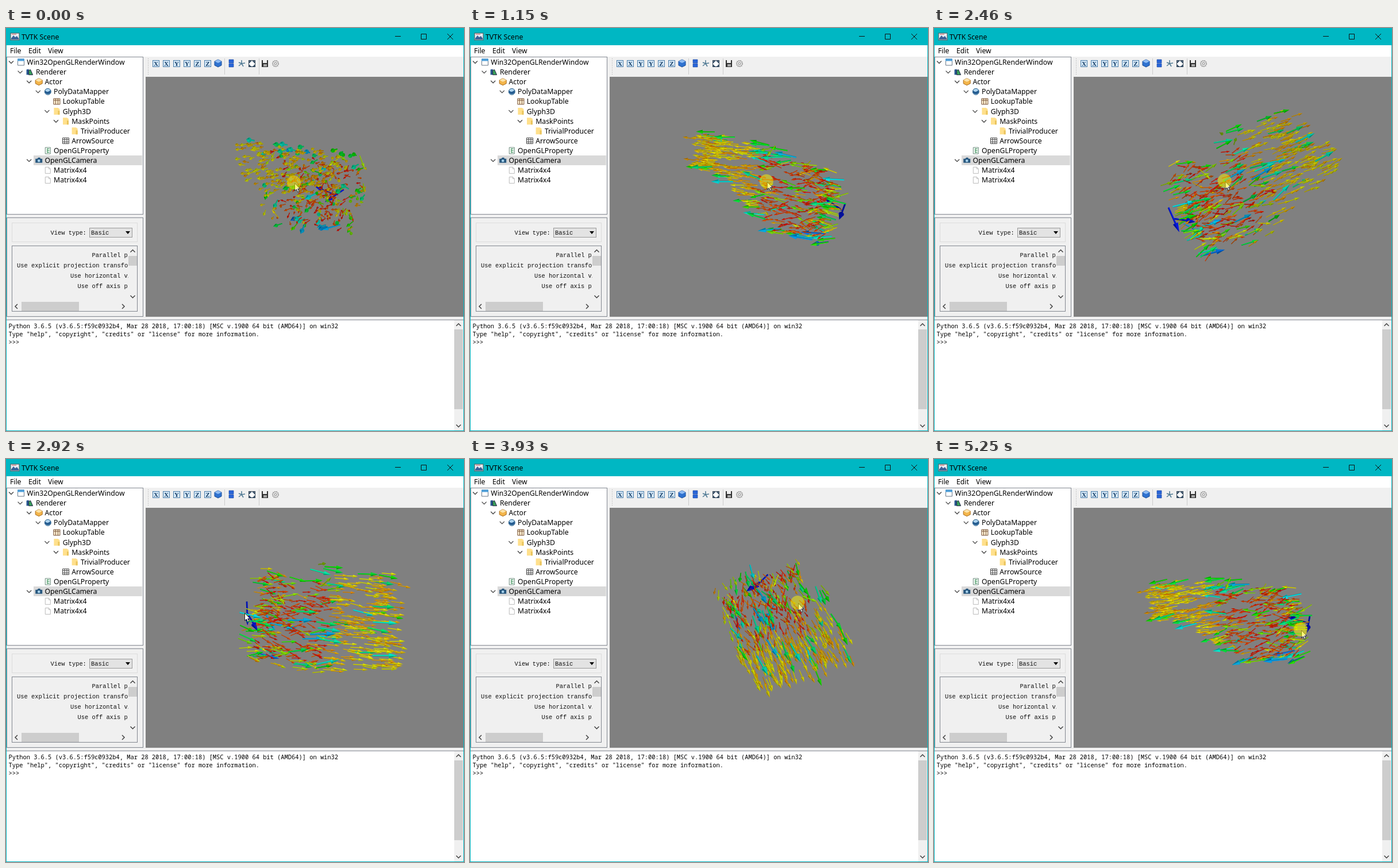
Write an HTML page with a canvas that moves like this. It is 797 px wide and 702 px high and loops after 5330 ms.

```html
<!DOCTYPE html>
<html lang="en">
<head>
<meta charset="utf-8">
<title>TVTK Scene</title>
<style>
html, body { margin: 0; width: 100%; height: 100%; overflow: hidden; background: #f0f0f0; }
svg, canvas { position: absolute; left: 0; top: 0; display: block; }
canvas { left: 243px; top: 85px; }
text { white-space: pre; }
.ui { font: 12.2px "Noto Sans", "Open Sans", sans-serif; }
.form { font: 10.4px "Liberation Mono", monospace; fill: #111; }
.con { font: 10.4px "Noto Sans Mono", "DejaVu Sans Mono", monospace; }
</style>
</head>
<body>
<svg width="797" height="702" viewBox="0 0 797 702">
  <defs><clipPath id="form"><rect x="11" y="380" width="202" height="96"/></clipPath></defs>
  <rect width="797" height="702" fill="#00b7c3"/>
  <rect x="1" y="30" width="795" height="671" fill="#f0f0f0"/>
  <rect x="1" y="30" width="795" height="20" fill="#fff"/>
  <rect x="8" y="9" width="15" height="12" fill="#e9eef5" stroke="#555"/>
  <path d="M9 18l4-5 3 3 3-2 3 4v2H9z" fill="#3a6298"/><path d="M10 11h8" stroke="#c55"/>
  <path d="M677 14.5h10M722.5 10.5h9v9h-9zM768 10l10 10M778 10l-10 10" fill="none" stroke="#111"/>
  <g class="ui"><text x="27" y="19.5">TVTK Scene</text><text x="7" y="44">File</text><text x="39" y="44">Edit</text><text x="73" y="44">View</text></g>

  <rect x="1.5" y="50.5" width="237" height="274" fill="#fff" stroke="#828790"/>
  <rect x="48" y="222" width="189" height="17" fill="#d9d9d9"/>
  <g id="tree"></g>

  <rect x="1.5" y="330.5" width="237" height="172" fill="none" stroke="#828790"/>
  <rect x="10.5" y="339.5" width="218" height="33" fill="none" stroke="#dcdcdc"/>
  <rect x="145.5" y="348.5" width="74" height="16" fill="#e3e3e3" stroke="#9a9a9a"/>
  <path d="M208 354h8l-4 5z"/>
  <g class="form"><text x="77.5" y="360">View type:</text><text x="148" y="360">Basic</text></g>
  <rect x="10.5" y="379.5" width="218" height="114" fill="#f0f0f0" stroke="#828790"/>
  <g class="form" clip-path="url(#form)">
    <text x="149.5" y="399">Parallel projection</text>
    <text x="19" y="417">Use explicit projection transform matrix</text>
    <text x="112" y="435">Use horizontal view angle</text>
    <text x="124.5" y="453">Use off axis projection</text>
  </g>
  <path d="M213 397h15v17h-15zM27 477h100v16H27z" fill="#cdcdcd"/>
  <path d="M216.5 390.500l4-4 4 4M216.500 466l4 4 4-4M20 481l-4 4 4 4M202 481l4 4-4 4" fill="none" stroke="#444" stroke-width="1.5"/>

  <path d="M247.5 53v28" stroke="#aaa" stroke-dasharray="1 2"/>
  <path d="M380.5 53v28M440.5 53v28" stroke="#ccc"/>
  <g id="tools"></g>
  <path d="M363 58l6-3 6 3v7l-6 3-6-3z" fill="#2f72d0" stroke="#184a94"/><path d="M363 58l6 3 6-3-6-3z" fill="#8fbcf3"/>
  <path d="M388 55h8v6h-8zM388 62h8v6h-8z" fill="#2965d8" stroke="#17409b" stroke-width=".6"/>
  <path d="M410 56v6l-5 4M410 62l6-1M410 62l3 5M405 60l5 2" stroke="#4e7893" stroke-width="1.5" fill="none"/>
  <rect x="422.5" y="56.5" width="11" height="11" fill="#fff" stroke="#345"/>
  <path d="M424 61v-3h3M429 58h3v3M432 64v3h-3M427 67h-3v-3" fill="none" stroke="#17324f" stroke-width="1.5"/>
  <path d="M445 56h11v12h-11z" fill="#333"/><path d="M447 56h7v5h-7z" fill="#eee"/><path d="M448 63h6v4h-6z" fill="#aaa"/>
  <circle cx="469" cy="62" r="5" fill="#e8e8e8" stroke="#999" stroke-width="2" stroke-dasharray="2 1"/>
  <circle cx="469" cy="62" r="2" fill="#f0f0f0" stroke="#888"/>
  <rect x="243" y="85" width="553" height="418" fill="#808080"/>

  <path d="M1 508.5h795" stroke="#828790"/>
  <rect x="1" y="509" width="779" height="192" fill="#fff"/>
  <rect x="780" y="525" width="15" height="139" fill="#cdcdcd"/>
  <path d="M783.5 519l4-4 4 4M783.5 691l4 4 4-4" fill="none" stroke="#444" stroke-width="1.5"/>
  <g class="con">
    <text x="4.5" y="523">Python 3.6.5 (v3.6.5:f59c0932b4, Mar 28 2018, 17:00:18) [MSC v.1900 64 bit (AMD64)] on win32</text>
    <text x="4.5" y="537">Type "help", "copyright", "credits" or "license" for more information.</text>
    <text x="4.5" y="551">&gt;&gt;&gt;</text>
  </g>
</svg>
<canvas id="scene" width="553" height="418"></canvas>
<script>
const LOOP = 5330, STEPS = 69;
const ctx = document.getElementById('scene').getContext('2d');

// ---- static tree and toolbar ----
const icons = {
  window: '<path d="M-5.5-5.5h11v11h-11z" fill="#fff" stroke="#678"/><path d="M-6-6H6v4H-6z" fill="#4d9ed8"/>',
  render: '<path d="M-6 5V-4l4-1v10z" fill="#27558d"/><path d="M-2 5v-8l3-1 4 9z" fill="#39a05a" stroke="#224"/>',
  actor: '<path d="M-6-3l6-3 6 3v6L0 6l-6-3z" fill="#f3b54b" stroke="#a86b1c"/><path d="M-6-3L0 0l6-3-6-3z" fill="#fbe3aa"/>',
  mapper: '<circle r="5.5" fill="#aed4ef" stroke="#2d5f88"/><path d="M-5-2Q0 3 5-3V2Q0 7-5 2z" fill="#245c90"/>',
  table: '<path d="M-5.5-5h11V5h-11zM-5.5-2h11M-2-5V5M2-5V5" fill="#fff3d6" stroke="#765035"/>',
  grid: '<path d="M-5.5-5h11V5h-11zM-5.5-2h11M-5.5 2h11M-2-5V5M2-5V5" fill="#fff" stroke="#444"/>',
  folder: '<path d="M-5-6h7l3 2V6H-5z" fill="#ffe08c"/><path d="M2-1h3v7H2z" fill="#eac45d"/>',
  prop: '<path d="M-4.5-5.5h9v11h-9z" fill="#fff" stroke="#687"/><path d="M-1-4v8M-1-3h4M-1 0h4M-1 3h4" stroke="#2d8a4e"/>',
  camera: '<path d="M-6-3h3l2-2h3l1 2h3v7H-6z" fill="#28587f"/><circle r="2.2" cy=".5" fill="#a9d4ee"/>',
  page: '<path d="M-4.5-5.5h6l3 3v8h-9z" fill="#fff" stroke="#bbb"/><path d="M1.5-5.5v3h3" fill="none" stroke="#bbb"/>'
};
// Two spaces per level, "+" marks an open branch
const outline = `+window Win32OpenGLRenderWindow
  +render Renderer
    +actor Actor
      +mapper PolyDataMapper
        table LookupTable
        +folder Glyph3D
          +folder MaskPoints
            folder TrivialProducer
          grid ArrowSource
      prop OpenGLProperty
    +camera OpenGLCamera
      page Matrix4x4
      page Matrix4x4`;
document.getElementById('tree').innerHTML = outline.split('\n').map((line, i) => {
  const [, indent, open, icon, label] = line.match(/^( *)(\+?)(\w+) (.+)$/);
  const x = 9 + indent.length * 7.8, y = 59.5 + i * 17.12;
  const chevron = open && `<path d="M${x - 4} ${y - 2}l4 4 4-4" fill="none" stroke="#444" stroke-width="1.3"/>`;
  return `${chevron}<g transform="translate(${x + 17} ${y})">${icons[icon]}</g>` +
    `<text class="ui" x="${x + 27.3}" y="${y + 4.5}">${label}</text>`;
}).join('');
document.getElementById('tools').innerHTML = [...'XXYYZZ'].map((c, i) => {
  const x = 255.5 + i * 18;
  return `<rect x="${x}" y="56.5" width="11" height="11" fill="#d7eafa" stroke="#4b7da8"/>` +
    `<text x="${x + 5.5}" y="66" text-anchor="middle" font-family="Liberation Serif, serif" font-weight="bold" font-size="11" fill="#123a63">${c}</text>`;
}).join('');

// ---- helpers ----
let seed = 20187;
function rand() {
  seed = (seed + 0x6D2B79F5) | 0;
  let t = Math.imul(seed ^ seed >>> 15, 1 | seed);
  t = t + Math.imul(t ^ t >>> 7, 61 | t) ^ t;
  return ((t ^ t >>> 14) >>> 0) / 4294967296;
}
const spread = a => (rand() * 2 - 1) * a;
const dot = (a, b) => a[0] * b[0] + a[1] * b[1] + a[2] * b[2];
const unit = a => { const n = Math.hypot(...a); return a.map(c => c / n); };
const ease = f => { f = Math.min(1, Math.max(0, f)); return f * f * (3 - 2 * f); };
const rotate = (a, b, angle) => {
  const c = Math.cos(angle), s = Math.sin(angle);
  return [a * c - b * s, a * s + b * c];
};

// ---- flow field in a tapering duct: x along the flow, y across, z up ----
const roof = u => .7 + 5.1 * Math.sqrt(u);
const floor = u => -5.2 + 7.1 * ease((u - .3) / .6);

function makeArrow() {
  const u = rand() ** 1.1, v = spread(1), w = rand();
  const z = floor(u) + (roof(u) - floor(u)) * w;
  const base = [-7.6 + 15.4 * u + (1 - w) * 1.4 * (1 - u), v * (4.8 + .04 * z), z + .4];
  const side = Math.abs(v), film = Math.abs(2 * w - 1);
  let s = .13 + rand() * .11, jitter = .14;
  if (u > .56) {
    if (film > .88 && rand() < .4) s = .35 + rand() * .35;
  } else if (film > .87) {
    s = .2 + rand() * .65;
    jitter = rand() < .15 ? 1.5 : .2;
  } else if (side > .88 || u < .06) {
    s = .14 + rand() ** 2 * .5;
    jitter = .4;
  } else {
    s = rand() < .16 ? .15 + rand() * .25 : .01 + rand() * .09;
    jitter = .85 - u * .8;
  }
  return { base, dir: unit([1, spread(jitter), .1 * u + spread(jitter)]), s, size: .95 + 2.05 * s };
}
const jet = (base, dir) => ({ base, dir: unit(dir), s: .97, size: 2.8 });
const arrows = Array.from({ length: 500 }, makeArrow).concat(
  jet([-7, .7, -1.6], [1.8, -2.4, 1.3]),
  jet([-7.2, 1.8, -.9], [.3, -2.2, -1.8])
);

// ---- drag motion: step, yaw, pitch, roll in degrees, pointer x, y ----
const drags = [
  [0, 72, 14, 3, 501, 269],
  [7, 3, 0, 7, 430, 264],
  [20, -3, 0, -2, 558, 268],
  [25, -114, 16, 0, 621, 265],
  [38, -180, 74, 8, 414, 267],
  [45, -180, 5, 18, 550, 168],
  [51, -250, 58, 0, 570, 250],
  [58, -292, 16, 6, 575, 238],
  [68, -357, 0, -14, 638, 297]
];
function viewAt(k) {
  const i = Math.max(1, drags.findIndex(d => d[0] >= k));
  const a = drags[i - 1], b = drags[i], f = ease((k - a[0]) / (b[0] - a[0]));
  const [, yaw, pitch, roll, px, py] = a.map((v, j) => v + (b[j] - v) * f);
  return { yaw, pitch, roll, px, py };
}

const SCALE = 16.5, EYE = 47, CENTER = [530 - 243, 288 - 85], RAD = Math.PI / 180;

function drawArrow({ p, neck, tip, facing, s, size }) {
  const shade = 1 - (facing > 0 ? .2 : -.38) * facing;
  const hue = s > .7 ? 190 + (s - .7) * 165 : s * 270;
  const color = l => `hsl(${hue} 97% ${l * shade}%)`;
  const length = size * neck[2];
  const r = Math.max(1.5, length * .1), width = Math.max(1.2, length * .058);
  const dx = tip[0] - neck[0], dy = tip[1] - neck[1], n = Math.hypot(dx, dy) || 1;
  const ox = -dy / n * r, oy = dx / n * r;

  const line = (w, l, shift) => {
    ctx.strokeStyle = color(l);
    ctx.lineWidth = w;
    ctx.beginPath();
    ctx.moveTo(p[0] + ox * shift, p[1] + oy * shift);
    ctx.lineTo(neck[0] + ox * shift, neck[1] + oy * shift);
    ctx.stroke();
  };
  const shaft = () => { line(width, 33, 0); line(width * .6, 48, -.1); };
  const disc = l => {
    ctx.fillStyle = color(l);
    ctx.beginPath();
    ctx.ellipse(neck[0], neck[1], r * Math.abs(facing), r, Math.atan2(dy, dx), 0, 7);
    ctx.fill();
  };
  const cone = (from, to, l) => {
    ctx.fillStyle = color(l);
    ctx.beginPath();
    ctx.moveTo(neck[0] + ox * from, neck[1] + oy * from);
    ctx.lineTo(tip[0], tip[1]);
    ctx.lineTo(neck[0] + ox * to, neck[1] + oy * to);
    ctx.fill();
  };
  const head = () => {
    if (facing > 0) disc(42);
    cone(-1, 1, 46);
    cone(.25, 1, 32);
    if (facing <= 0) disc(44);
  };
  (facing > 0 ? [shaft, head] : [head, shaft]).forEach(part => part());
}

function drawScene({ yaw, pitch, roll }) {
  // Result: x right, y down, z toward the viewer
  const turn = ([along, across, up]) => {
    let [x, z] = rotate(-along, across, -yaw * RAD), y = -up;
    x = -along * Math.cos(yaw * RAD) + across * Math.sin(yaw * RAD);
    z = along * Math.sin(yaw * RAD) + across * Math.cos(yaw * RAD);
    [z, y] = rotate(z, y, pitch * RAD);
    [x, y] = rotate(x, y, roll * RAD);
    return [x, y, z];
  };
  const project = m => {
    const f = SCALE * EYE / (EYE - m[2]);
    return [CENTER[0] + m[0] * f, CENTER[1] + m[1] * f, f];
  };
  arrows.map(a => {
    const b = turn(a.base), d = turn(a.dir);
    const at = f => b.map((c, i) => c + d[i] * a.size * f);
    const mid = at(.5), ray = unit([-mid[0], -mid[1], EYE - mid[2]]);
    return { ...a, p: project(b), neck: project(at(.65)), tip: project(at(1)), facing: dot(d, ray), depth: mid[2] };
  }).sort((a, b) => a.depth - b.depth).forEach(drawArrow);
}

// ---- pointer with press highlight ----
const pointerShape = new Path2D('M0 0V15L3.5 12L6 17.5L8.5 16.5L6 11H10.5Z');

function drawPointer({ px, py }, pressed) {
  ctx.save();
  ctx.translate(px - 243, py - 85);
  ctx.save();
  ctx.translate(1.5, 1.5);
  ctx.scale(.87, .87);
  ctx.fillStyle = '#fff';
  ctx.strokeStyle = '#111';
  ctx.lineWidth = 1;
  ctx.fill(pointerShape);
  ctx.stroke(pointerShape);
  ctx.restore();
  if (pressed) {
    ctx.fillStyle = 'rgba(250,240,0,.52)';
    ctx.beginPath();
    ctx.arc(0, 0, 12, 0, 7);
    ctx.fill();
  }
  ctx.restore();
}

let shown = -1;
const start = performance.now();
function frame() {
  const ms = (performance.now() - start) % LOOP;
  const k = Math.min(STEPS - 1, Math.floor(ms * STEPS / LOOP + .2));
  if (k !== shown) {
    shown = k;
    const view = viewAt(k);
    ctx.fillStyle = '#808080';
    ctx.fillRect(0, 0, 553, 418);
    drawScene(view);
    drawPointer(view, Math.abs(k - 39) > 2);
  }
  requestAnimationFrame(frame);
}
frame();
</script>
</body>
</html>
```
